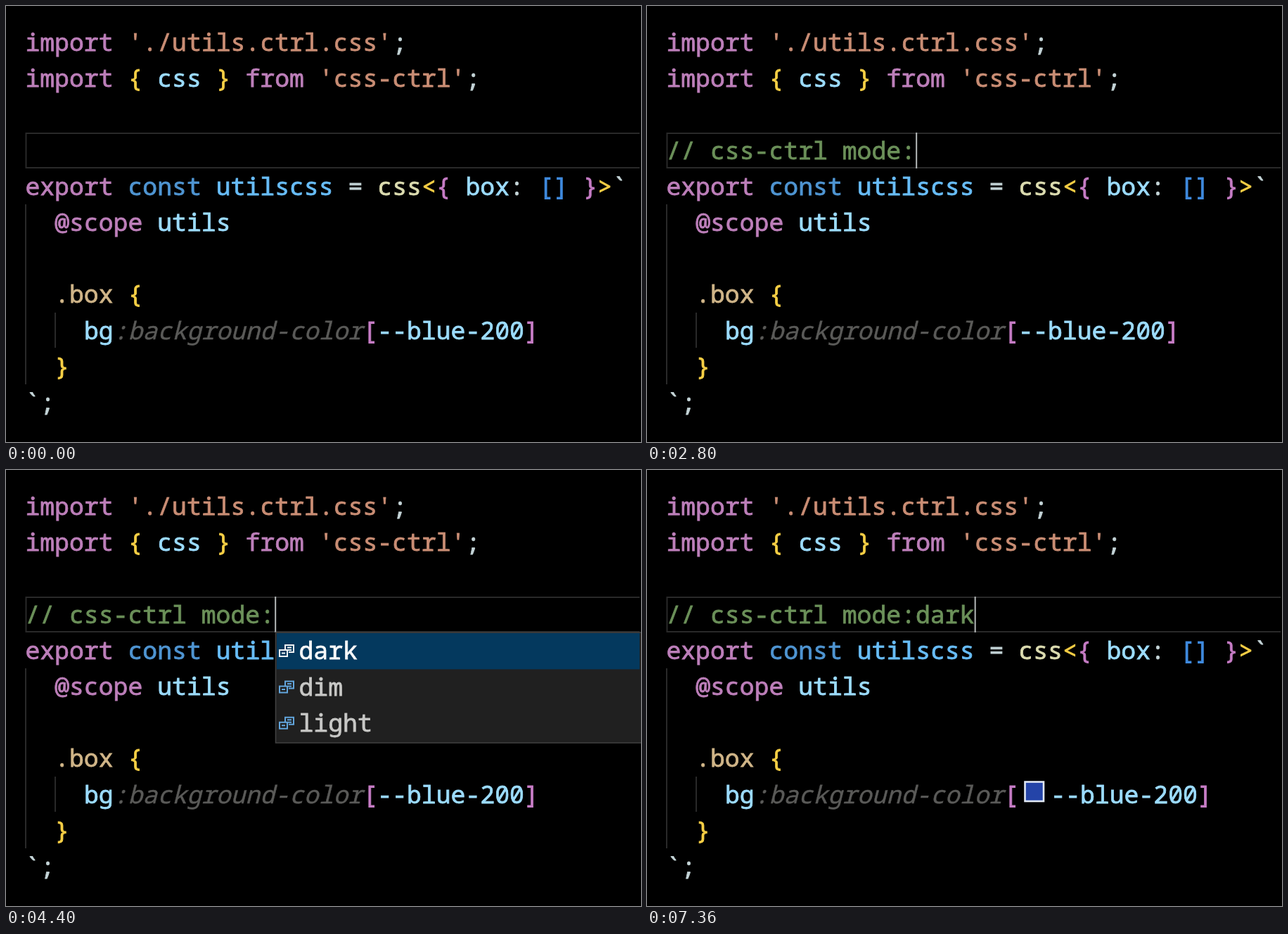
Recreate the animation shown at these times as an HTML page. Size 903 px wide and 620 px high, loop 7.44 s.

```html
<!DOCTYPE html>
<html lang="en">
<head>
<meta charset="utf-8">
<title>Editor typing</title>
<style>
  html, body { margin: 0; width: 100%; height: 100%; overflow: hidden; background: #000; }
  svg { display: block; width: 903px; height: 620px; }
  text {
    font: 34.78px "Noto Sans Mono", "DejaVu Sans Mono", monospace; white-space: pre;
    fill: currentColor; stroke: currentColor; stroke-width: 0.8px;
  }
  .ghost { font-style: italic; stroke-width: 0.4px; }
</style>
</head>
<body>
<svg id="stage" viewBox="0 0 903 620"></svg>
<script>
const LOOP = 7440;
const LEFT = 27.4, CELL = 20.87, BASE = 64, LINE = 51.2;
const MENU_TOP = 232, ROW = 51.4;
const COMMENT = '// css-ctrl mode:dark';
const OPTIONS = ['dark', 'dim', 'light'];

const C = {
  key: '#bd7fba', str: '#c98d74', plain: '#c3d3d6', gold: '#f7cf45', name: '#9cdcfe',
  decl: '#4f95d2', constant: '#68bdf8', func: '#dcdcb0', pink: '#c67cc5', blue: '#3f8ade',
  selector: '#d0b588', ghost: '#5a5a58', comment: '#6b9059', rule: '#292929'
};

// line, column, text, colour
const TOKENS = [
  [0, 0, 'import', 'key'], [0, 7, "'./utils.ctrl.css'", 'str'], [0, 25, ';', 'plain'],
  [1, 0, 'import', 'key'], [1, 7, '{', 'gold'], [1, 9, 'css', 'name'], [1, 13, '}', 'gold'],
  [1, 15, 'from', 'key'], [1, 20, "'css-ctrl'", 'str'], [1, 30, ';', 'plain'],
  [4, 0, 'export', 'key'], [4, 7, 'const', 'decl'], [4, 13, 'utilscss', 'constant'],
  [4, 22, '=', 'plain'], [4, 24, 'css', 'func'], [4, 27, '<', 'gold'], [4, 28, '{', 'pink'],
  [4, 30, 'box', 'name'], [4, 33, ':', 'plain'], [4, 35, '[]', 'blue'], [4, 38, '}', 'pink'],
  [4, 39, '>', 'gold'], [4, 40, '`', 'plain'],
  [5, 2, '@scope', 'key'], [5, 9, 'utils', 'name'],
  [7, 2, '.box', 'selector'], [7, 7, '{', 'gold'],
  [8, 4, 'bg', 'name'], [8, 6, ':background-color', 'ghost'], [8, 23, '[', 'pink'],
  [9, 2, '}', 'gold'],
  [10, 0, '`', 'plain'], [10, 1, ';', 'plain']
];

// Each track lists [start ms, value]; a value holds until the next step.
const TYPED = [
  [0, 0], [640, 1], [720, 2], [800, 3], [1040, 4], [1200, 5], [1280, 6], [1360, 7],
  [1440, 8], [1760, 9], [1840, 10], [2000, 11], [2240, 13], [2400, 14], [2480, 16],
  [2800, 17], [4640, 21]
];
const CARET = [[0, 0], [160, 1], [5200, 0], [5600, 1], [6080, 0], [6560, 1], [6960, 0], [7360, 1]];
const PICK = [[0, -1], [2960, 0], [3280, 1], [3680, 2], [4160, 1], [4400, 0], [4640, -1]];
const SWATCH = [[0, 0], [5680, 1]];

const stage = document.getElementById('stage');

function add(tag, attrs, parent = stage) {
  const el = document.createElementNS('http://www.w3.org/2000/svg', tag);
  for (const key in attrs) el.setAttribute(key, attrs[key]);
  return parent.appendChild(el);
}

function rect(x, y, width, height, fill, parent) {
  return add('rect', { x, y, width, height, fill }, parent);
}

function label(x, y, str, color, parent) {
  const el = add('text', { x, y, color }, parent);
  el.textContent = str;
  return el;
}

function code(line, col, str, color, parent) {
  const el = label(LEFT + col * CELL, BASE + line * LINE, str, C[color], parent);
  if (color === 'ghost') el.classList.add('ghost');
  return el;
}

function show(el, on) {
  el.setAttribute('visibility', on ? 'visible' : 'hidden');
}

function at(track, t) {
  let value = track[0][1];
  for (const [start, next] of track) if (t >= start) value = next;
  return value;
}

add('path', { d: 'M901 181H28.5V230H901', fill: 'none', stroke: C.rule, 'stroke-width': 2 });
rect(27, 282, 2, 256, C.rule);
rect(69, 436, 2, 50, C.rule);
TOKENS.forEach(token => code(...token));

const value = add('g', {});
code(8, 24, '--blue-200', 'name', value);
code(8, 34, ']', 'pink', value);
const swatch = add('rect', {
  x: 537.5, y: 443.5, width: 26.5, height: 27.5, fill: '#2444a8', stroke: '#e0e8f4', 'stroke-width': 2.6
});

const comment = code(3, 0, '', 'comment');
const caret = rect(0, 180, 2, 51, '#b4b8b8');

const menu = add('g', {});
add('rect', { x: 383.5, y: 231, width: 530, height: 157, fill: '#202020', stroke: '#424242', 'stroke-width': 1.5 }, menu);
const bar = rect(385, 0, 516, ROW, '#04395e', menu);
const rows = OPTIONS.map((name, i) => {
  const row = add('g', { transform: `translate(0 ${MENU_TOP + i * ROW})` }, menu);
  const icon = add('path', {
    d: 'M397 24V17H409V27H402M400 20.5H406M400 24H406M389 24H400V33H389ZM392 28.5H397',
    fill: 'none', 'stroke-width': 2
  }, row);
  return { icon, text: label(416.5, 37.3, name, '#c8c8c6', row) };
});

function draw(t) {
  const typed = at(TYPED, t), pick = at(PICK, t), colored = at(SWATCH, t);
  comment.textContent = COMMENT.slice(0, typed);
  caret.setAttribute('x', LEFT + typed * CELL);
  show(caret, at(CARET, t));
  show(menu, pick >= 0);
  bar.setAttribute('y', MENU_TOP + Math.max(pick, 0) * ROW);
  rows.forEach(({ icon, text }, i) => {
    icon.setAttribute('stroke', i === pick ? '#f4f4f4' : '#62a5dc');
    text.setAttribute('color', i === pick ? '#fafafa' : '#c8c8c6');
  });
  show(swatch, colored);
  value.setAttribute('transform', `translate(${colored ? 46 : 0} 0)`);
}

const began = performance.now();
function tick() {
  draw((performance.now() - began) % LOOP);
  requestAnimationFrame(tick);
}
draw(0);
requestAnimationFrame(tick);
</script>
</body>
</html>
```
